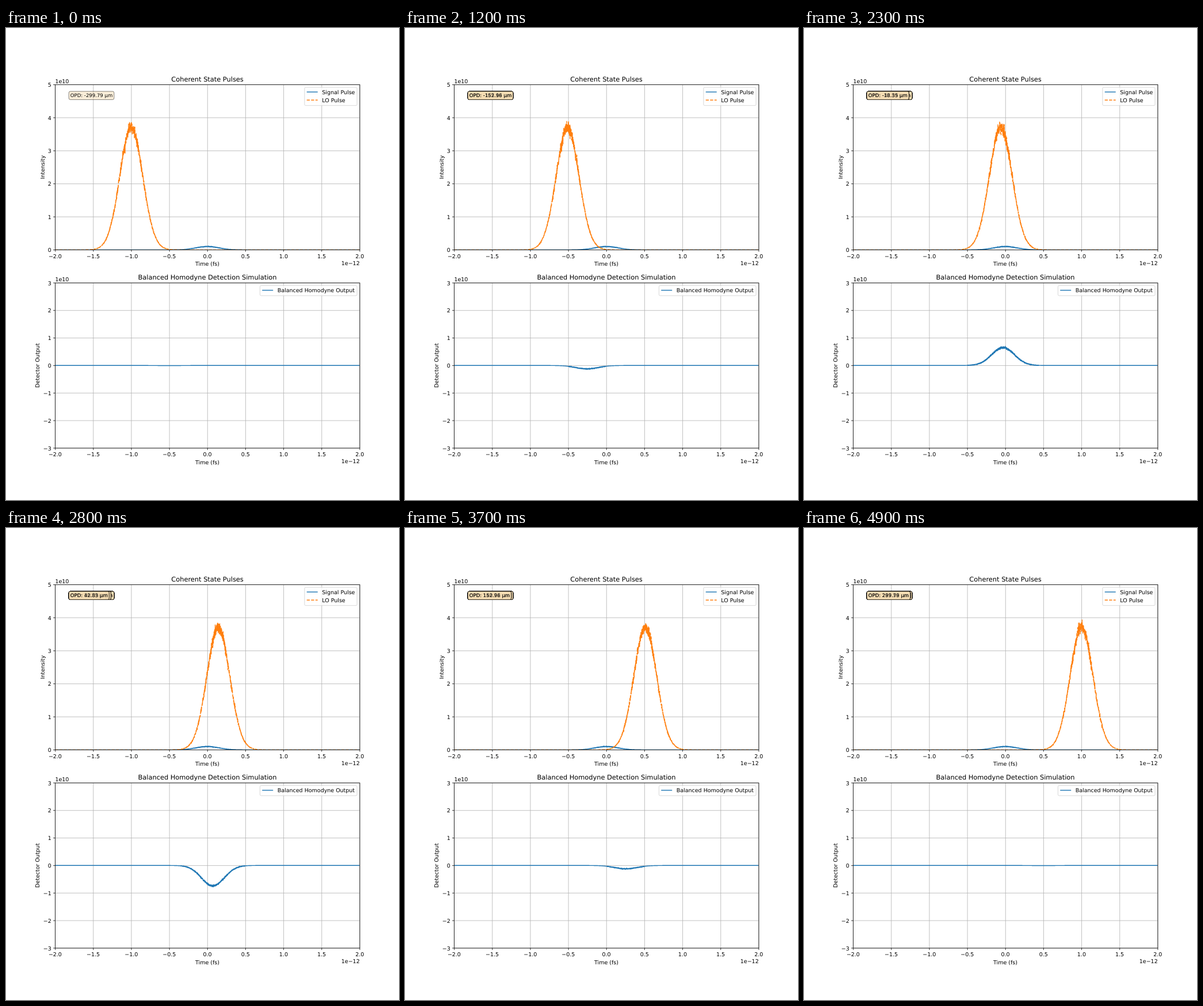
An HTML page for the animation above (5000 ms loop, 683x820 px).

```html
<!DOCTYPE html>
<html lang="en">
<head>
<meta charset="utf-8">
<title>Balanced Homodyne Detection Simulation</title>
<style>
  html, body { margin: 0; width: 100%; height: 100%; overflow: hidden; background: #fff; }
  svg { display: block; width: 100%; height: 100%; }
  text { font: 9.49px "DejaVu Sans", sans-serif; text-rendering: geometricPrecision; }
  .title { font-size: 11.38px; }
  .opd { font-size: 8.54px; }
  .mid { text-anchor: middle; }
  .end { text-anchor: end; }
  .grid { stroke: #b0b0b0; stroke-width: .8; }
  .tick, .frame { stroke: #000; stroke-width: .8; fill: none; }
  .curve { fill: none; stroke-width: 1.42; stroke-linejoin: round; }
  .blue { stroke: #1f77b4; }
  .orange { stroke: #ff7f0e; stroke-dasharray: 5.27 2.28; }
  .legend { fill: #fff; fill-opacity: .8; stroke: #ccc; stroke-opacity: .8; stroke-width: .95; }
  .box { fill: #f5deb3; stroke: #000; stroke-width: .95; fill-opacity: .5; stroke-opacity: .5; }
</style>
</head>
<body>
<svg id="stage" viewBox="0 0 683 820"></svg>
<script>
const STEPS = 50, STEP_MS = 100, SAMPLES = 5000;
const SIGMA = 0.15, WINDOW = 0.5;             // ps
const LO_PEAK = 3.7, SIGNAL_PEAK = 0.1;       // units of 1e10
const LIGHT = 299.792458, WAVELENGTH = 1.55;  // µm per ps, µm
const LEFT = 85.4, WIDTH = 529.3, HEIGHT = 287;

const stage = document.getElementById("stage");

function add(parent, name, attrs, content) {
  const node = document.createElementNS("http://www.w3.org/2000/svg", name);
  for (const key in attrs) node.setAttribute(key, attrs[key]);
  if (content !== undefined) node.textContent = content;
  parent.appendChild(node);
  return node;
}
const write = (content, x, y, cls = "") => add(stage, "text", { x, y, class: cls }, content);
const line = (x1, y1, x2, y2, cls) => add(stage, "line", { x1, y1, x2, y2, class: cls });
const minus = s => String(s).replace("-", "\u2212");
const xOf = t => LEFT + (t + 2) * WIDTH / 4;

function makeAxes({ top, min, max, title, label, labelX, curves }) {
  const bottom = top + HEIGHT, scale = HEIGHT / (max - min);
  const yOf = v => bottom - (v - min) * scale;
  const clip = add(stage, "clipPath", { id: "clip" + Math.round(top) });
  const area = { x: LEFT, y: top, width: WIDTH, height: HEIGHT };
  add(clip, "rect", area);

  const xs = [...Array(9)].map((_, i) => -2 + i / 2);
  const ys = [...Array(max - min + 1)].map((_, i) => min + i);
  for (const t of xs) line(xOf(t) + .2, top, xOf(t) + .2, bottom, "grid");
  for (const v of ys) line(LEFT, yOf(v) + .1, LEFT + WIDTH, yOf(v) + .1, "grid");

  const group = add(stage, "g", { "clip-path": `url(#${clip.id})` });
  const paths = curves.map(c => add(group, "path", { class: "curve " + c }));

  for (const t of xs) {
    line(xOf(t) + .2, bottom, xOf(t) + .2, bottom + 3.3, "tick");
    write(minus(t.toFixed(1)), xOf(t), bottom + 14.5, "mid");
  }
  for (const v of ys) {
    line(LEFT - 3.3, yOf(v) + .1, LEFT, yOf(v) + .1, "tick");
    write(minus(v), LEFT - 6.6, yOf(v) + 3.7, "end");
  }
  add(stage, "rect", { ...area, x: LEFT + .2, y: top + .1, class: "frame" });
  write(title, LEFT + WIDTH / 2, top - 5.6, "title mid");
  write("Time (fs)", LEFT + WIDTH / 2, bottom + 27.9, "mid");
  write("1e\u221212", LEFT + WIDTH, bottom + 26.6, "end");
  write("1e10", LEFT, top - 2.8);
  const name = write(label, 0, 0, "mid");
  name.setAttribute("transform", `translate(${labelX} ${top + HEIGHT / 2}) rotate(-90)`);
  return { paths, yOf };
}

function makeLegend(x, y, rows) {
  add(stage, "rect", { x, y, width: 610 - x, height: 3.4 + 14.1 * rows.length, rx: 1.9, class: "legend" });
  rows.forEach(([name, color], i) => {
    const mid = y + 8.1 + 14.1 * i;
    line(x + 3.8, mid, x + 22.8, mid, "curve " + color);
    write(name, x + 30.4, mid + 3.3);
  });
}

function makeLabel(delay) {
  const group = add(stage, "g", {});
  const box = add(group, "rect", { x: 109.2, y: 110.1, height: 14.3, rx: 2.56, class: "box" });
  const text = add(group, "text", { x: 111.85, y: 120, class: "opd" },
    `OPD: ${(delay * LIGHT).toFixed(2)} µm`);
  box.setAttribute("width", text.getComputedTextLength() + 5.2);
  return group;
}

function makeNoise(seed) {
  let state = seed * 7919 + 17;
  const uniform = () => {
    state = (state + 0x6d2b79f5) | 0;
    let n = Math.imul(state ^ (state >>> 15), 1 | state);
    n = (n + Math.imul(n ^ (n >>> 7), 61 | n)) ^ n;
    return ((n ^ (n >>> 14)) >>> 0) / 4294967296;
  };
  return () => Math.sqrt(-2 * Math.log(1 - uniform())) * Math.cos(2 * Math.PI * uniform());
}

const gauss = t => Math.exp(-t * t / (2 * SIGMA * SIGMA));
const delayAt = step => -1 + 2 * step / (STEPS - 1);

function trace(fn, yOf) {
  let d = "";
  for (let i = 0; i < SAMPLES; i++) {
    const t = -2 + 4 * i / (SAMPLES - 1);
    d += (i ? "L" : "M") + xOf(t).toFixed(2) + " " + yOf(fn(t)).toFixed(2);
  }
  return d;
}

// Relative noise grows as the light gets weaker.
function pulse(peak, center, noise) {
  return t => {
    const value = peak * gauss(t - center);
    const noisy = Math.abs(t - center) < WINDOW;
    return noisy ? value * (1 + 0.022 * Math.pow(value / LO_PEAK, -.25) * noise()) : value;
  };
}

// Interference of both fields; it is noisy only where the pulses overlap.
function homodyne(delay, noise) {
  const overlap = Math.exp(-delay * delay / (8 * SIGMA * SIGMA));
  const swing = 2 * Math.sqrt(LO_PEAK * SIGNAL_PEAK) * overlap
    * Math.cos(2 * Math.PI * delay * LIGHT / WAVELENGTH);
  return t => {
    const shape = gauss(t - delay / 2);
    const noisy = Math.abs(t) < WINDOW && Math.abs(t - delay) < WINDOW;
    const jitter = noisy ? 0.018 * Math.sqrt(overlap) * Math.pow(shape, .35) * noise() : 0;
    return swing * shape + jitter;
  };
}

const pulses = makeAxes({
  top: 98.4, min: 0, max: 5, title: "Coherent State Pulses",
  label: "Intensity", labelX: 66.8, curves: ["blue", "orange"]
});
const labels = [...Array(STEPS)].map((_, i) => makeLabel(delayAt(i)));
makeLegend(518.9, 103.1, [["Signal Pulse", "blue"], ["LO Pulse", "orange"]]);
const detector = makeAxes({
  top: 442.8, min: -3, max: 3, title: "Balanced Homodyne Detection Simulation",
  label: "Detector Output", labelX: 58.4, curves: ["blue"]
});
makeLegend(441.4, 447.5, [["Balanced Homodyne Output", "blue"]]);

function draw(step) {
  const delay = delayAt(step), noise = makeNoise(step + 1);
  const [signal, lo] = pulses.paths;
  signal.setAttribute("d", trace(pulse(SIGNAL_PEAK, 0, noise), pulses.yOf));
  lo.setAttribute("d", trace(pulse(LO_PEAK, delay, noise), pulses.yOf));
  detector.paths[0].setAttribute("d", trace(homodyne(delay, noise), detector.yOf));
  // Labels pile up until the loop restarts.
  labels.forEach((label, i) => label.setAttribute("display", i <= step ? "inline" : "none"));
}

let shown = -1;
const start = performance.now();
function tick() {
  const step = Math.floor((performance.now() - start) / STEP_MS) % STEPS;
  if (step !== shown) draw(shown = step);
  requestAnimationFrame(tick);
}
tick();
</script>
</body>
</html>
```
